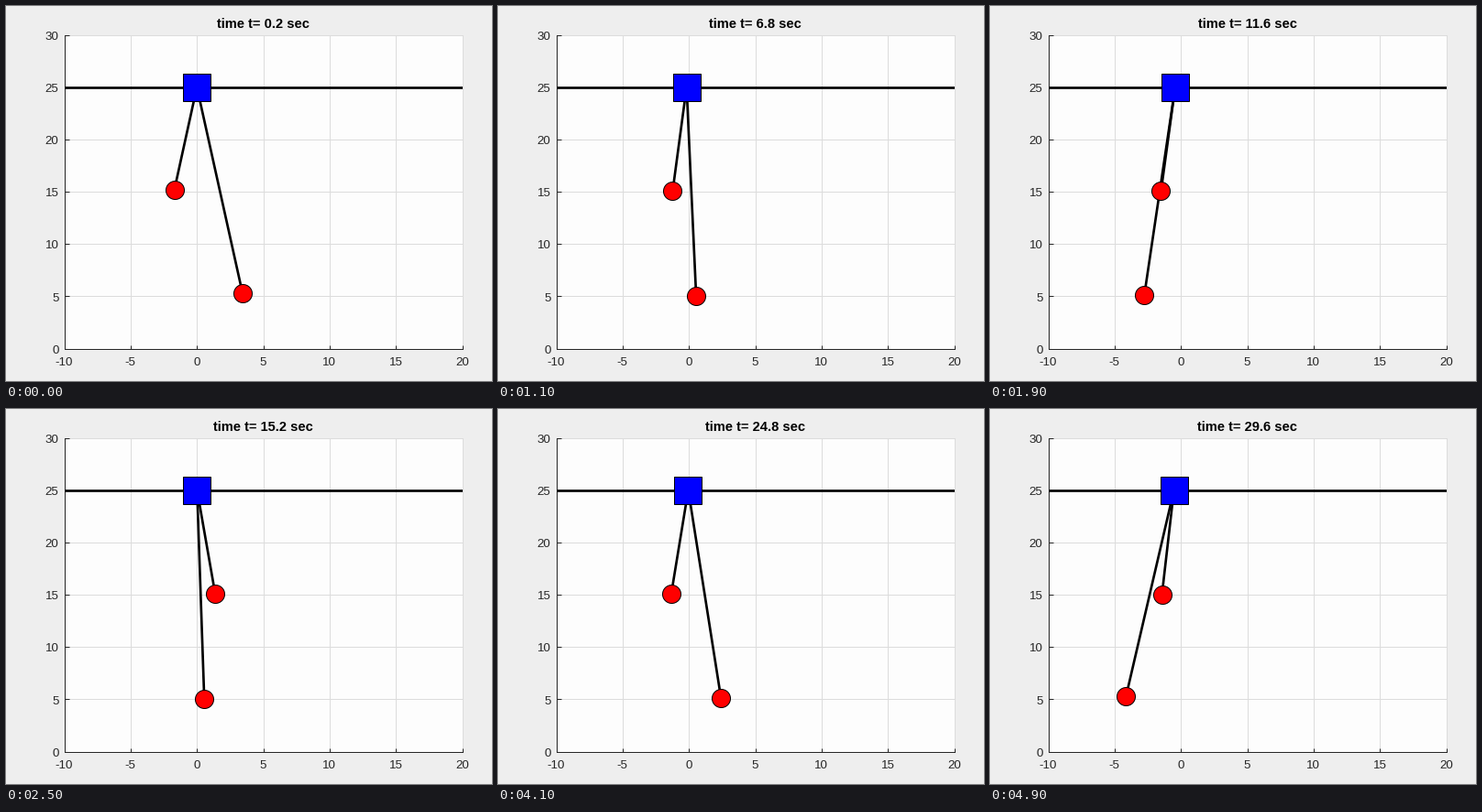
These frames come from a looping animation (530 px wide and 410 px high, 5 s). A matplotlib script:

```python
import numpy as np
import matplotlib.pyplot as plt
from matplotlib.animation import FuncAnimation

W, H, DPI = 530, 410, 80
PT = 72 / DPI  # points per pixel
LEFT, RIGHT, TOP, BOTTOM = 63.5, 497.5, 31.5, 374.5
INK = "#262626"
FRAMES, INTERVAL = 50, 100

# Cart carrying two pendulums, small-angle free swing
CART_MASS, BOB_MASS, GRAVITY = 1000, 100, 9.81
TRACK_Y = 25
LENGTHS = np.array([20.0, 10.0])
START = np.radians([10.0, -10.0])

mass_ratio = BOB_MASS / CART_MASS
root = np.sqrt(LENGTHS)
stiffness = GRAVITY * (np.eye(2) + mass_ratio) / np.outer(root, root)
omega_sq, modes = np.linalg.eigh(stiffness)
amplitudes = modes.T @ (START * root)


def pose(t):
    """Cart position and bob coordinates at time t."""
    angles = modes @ (amplitudes * np.cos(np.sqrt(omega_sq) * t)) / root
    shift = BOB_MASS * np.sum(LENGTHS * (angles - START))
    cart = shift / (CART_MASS + 2 * BOB_MASS)
    bob_x = cart + LENGTHS * np.sin(angles)
    bob_y = TRACK_Y - LENGTHS * np.cos(angles)
    return cart, bob_x, bob_y


plt.rcParams["font.family"] = "Liberation Sans"
fig = plt.figure(figsize=(W / DPI, H / DPI), dpi=DPI, facecolor="#eeeeee")
ax = fig.add_axes([LEFT / W, 1 - BOTTOM / H, (RIGHT - LEFT) / W, (BOTTOM - TOP) / H],
                  facecolor="#fdfdfd")
ax.set(xlim=(-10, 20), ylim=(0, 30))
x_ticks, y_ticks = range(-10, 21, 5), range(0, 31, 5)
ax.set_xticks(x_ticks)
ax.set_yticks(y_ticks)
ax.tick_params(direction="in", length=4.5 * PT, width=PT, color=INK,
               labelbottom=False, labelleft=False)
ax.grid(color="#dcdcdc", linewidth=PT)
ax.set_axisbelow(True)
for line in ax.get_xgridlines() + ax.get_ygridlines():
    line.set_clip_on(False)
for side, spine in ax.spines.items():
    spine.set(linewidth=PT, color=INK, visible=side in ("left", "bottom"))


def tick_label(value, anchor, offset, align):
    ax.annotate(str(value), anchor, xytext=np.array(offset) * PT,
                textcoords="offset points", ha=align, va="baseline",
                fontsize=13.33 * PT, color=INK, annotation_clip=False)


for value in x_ticks:
    tick_label(value, (value, 0), (0, -18.5), "center")
for value in y_ticks:
    tick_label(value, (-10, value), (-6, -5.3), "right")

title = fig.text(280.5 / W, 1 - 24 / H, "", ha="center", va="baseline",
                 fontsize=14.67 * PT, fontweight="bold", color="black")

stroke = dict(color="black", linewidth=2.67 * PT, solid_capstyle="butt")
ax.plot([-10, 20], [TRACK_Y, TRACK_Y], zorder=3, **stroke)
rods = [ax.plot([], [], zorder=4, **stroke)[0] for _ in LENGTHS]


def marker(shape, size, color, zorder):
    return ax.plot([], [], shape, markersize=size * PT, markerfacecolor=color,
                   markeredgecolor="black", markeredgewidth=PT, zorder=zorder)[0]


cart_mark = marker("s", 30, "#0000ff", 5)
bob_marks = marker("o", 20, "#ff0000", 6)


def update(frame):
    t = 0.2 + 0.6 * frame
    cart, bob_x, bob_y = pose(t)
    for rod, x, y in zip(rods, bob_x, bob_y):
        rod.set_data([cart, x], [TRACK_Y, y])
    cart_mark.set_data([cart], [TRACK_Y])
    bob_marks.set_data(bob_x, bob_y)
    title.set_text(f"time t= {t:g} sec")
    return [*rods, cart_mark, bob_marks, title]


anim = FuncAnimation(fig, update, frames=FRAMES, interval=INTERVAL,
                     repeat=True, repeat_delay=0, blit=False)
plt.show()
```
